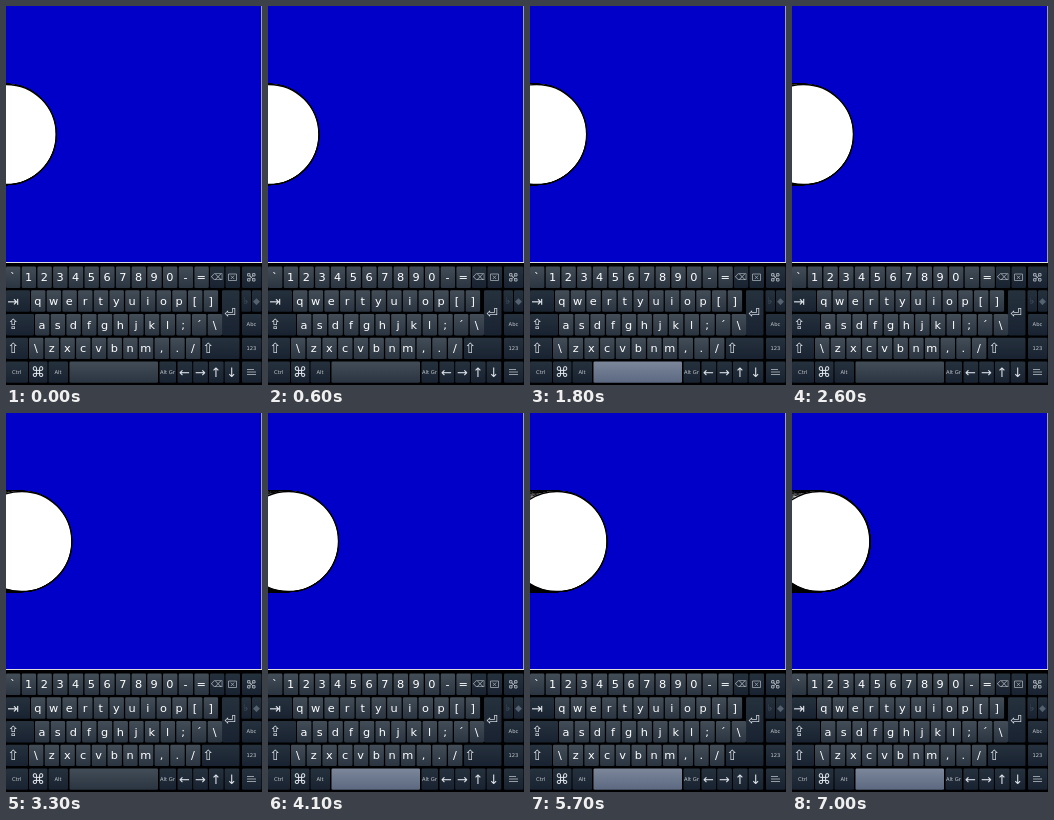
An HTML page with a canvas that plays this animation: 256 by 379 pixels, repeating every 8000 ms.

```html
<!DOCTYPE html>
<html lang="en">
<head>
<meta charset="utf-8">
<title>Sliding ball and keyboard</title>
<style>
  html, body { margin: 0; width: 256px; height: 379px; overflow: hidden; background: #000; }
  canvas, svg { position: absolute; left: 0; top: 0; display: block; }
  text { font-family: "DejaVu Sans", sans-serif; text-anchor: middle; }
</style>
</head>
<body>
<canvas width="256" height="257"></canvas>
<svg width="256" height="379" viewBox="0 0 256 379">
  <defs>
    <linearGradient id="plain" x2="0" y2="1"><stop stop-color="#434d58"/><stop offset="1" stop-color="#2b3541"/></linearGradient>
    <linearGradient id="dark" x2="0" y2="1"><stop stop-color="#26313e"/><stop offset="1" stop-color="#182230"/></linearGradient>
    <linearGradient id="lit" x2="0" y2="1"><stop stop-color="#7c879b"/><stop offset="1" stop-color="#5b6880"/></linearGradient>
  </defs>
  <g id="keys"></g>
</svg>
<script>
const LOOP = 8000, STEP = 100;
const PRESSES = [[1000, 2600], [4100, 4700], [5700, 8000]];
const PITCH = 15.7, ROW = 23.7, TOP = 260.6, KEY_H = 21.4;
const keys = document.getElementById('keys');
const ctx = document.querySelector('canvas').getContext('2d');

function add(tag, attrs, label) {
  const el = document.createElementNS('http://www.w3.org/2000/svg', tag);
  for (const name in attrs) el.setAttribute(name, attrs[name]);
  if (label) el.textContent = label;
  return keys.appendChild(el);
}

function key(row, x, right, label, { size = 11, fill = 'dark', color = '#dfe4ea', h = KEY_H, tx } = {}) {
  const y = TOP + row * ROW;
  const cap = add('rect', { x, y, width: right - x, height: h, rx: 1.3, fill: `url(#${fill})` });
  if (label) {
    add('text', {
      x: tx ?? (x + right) / 2 - 0.3, y: y + h / 2 + size * 0.34, 'font-size': size, fill: color
    }, label);
  }
  return cap;
}

function letters(row, x, chars) {
  [...chars].forEach((c, i) =>
    key(row, x + i * PITCH, x + i * PITCH + 14.4, c, { size: 11.3, fill: 'plain', color: '#fff' }));
}

function icon(d, width) {
  add('path', { d, fill: 'none', stroke: '#a4acb4', 'stroke-width': width });
}

const small = { size: 5.2, color: '#c3c9cf' };
const dim = { size: 9, color: '#566270' };

letters(0, 0, '`1234567890-=');
key(0, 204, 218.3, '⌫', { size: 8.5, color: '#aeb5bc' });
key(0, 219.5, 234, '');
icon('M222.5 268h8v6.5h-8zM224.8 269.6l3.4 3.4m0-3.4l-3.4 3.4', 0.8);
key(0, 236, 255.5, '');
icon('M243.5 269.5l3.6 3.6m0-3.6l-3.6 3.6M241.6 267.6h2.4v2.4h-2.4zm5 0h2.4v2.4h-2.4zm-5 5h2.4v2.4h-2.4zm5 0h2.4v2.4h-2.4z', 1);

key(1, 0, 24, '⇥', { size: 14, tx: 7 });
letters(1, 25, 'qwertyuiop[]');
key(1, 216, 233.5, '⏎', { size: 14, tx: 224, h: ROW + KEY_H });
key(1, 235.5, 245, '♭', dim);
key(1, 246, 255.5, '◆', dim);

key(2, 0, 28, '⇪', { size: 14, tx: 7 });
letters(2, 29, 'asdfghjkl;´\\');
key(2, 236, 255.5, 'Abc', small);

key(3, 0, 22, '⇧', { size: 14, tx: 7 });
letters(3, 23, '\\zxcvbnm,./');
key(3, 196, 233.5, '⇧', { size: 14, tx: 202 });
key(3, 236, 255.5, '123', small);

key(4, 0, 22, 'Ctrl', small);
key(4, 23, 41.5, '⌘', { size: 14 });
key(4, 42.5, 62, 'Alt', small);
const space = key(4, 63.5, 152, '', { fill: 'plain' });
key(4, 153.5, 170, 'Alt Gr', small);
[...'←→↑↓'].forEach((c, i) => key(4, 171.5 + i * PITCH, 186.2 + i * PITCH, c, { size: 13 }));
key(4, 236, 255.5, '');
icon('M241 363.5h7m-7 2.5h9m-9 2.5h9', 0.9);

function disc(x, y, paint) {
  ctx.beginPath();
  ctx.arc(x, y, 50, 0, 2 * Math.PI);
  ctx[paint]();
}

// The stage is never cleared between moves, so older outlines remain behind the ball.
function drawBall(last) {
  ctx.fillStyle = '#ddd';
  ctx.fillRect(0, 0, 256, 257);
  ctx.fillStyle = '#a0a0a0';
  ctx.fillRect(255, 0, 1, 256);
  ctx.fillStyle = '#0000c8';
  ctx.fillRect(0, 0, 255, 256);
  ctx.fillStyle = '#fff';
  ctx.strokeStyle = '#000';
  ctx.lineWidth = 1.3;
  for (let i = -54; i <= last * 6; i++) {
    const x = 13 + 15 * Math.cos((i / 6 - 66) * 2.4 * Math.PI / 180);
    disc(x - 0.5, 128, 'fill');
    disc(x, 128.5, 'stroke');
  }
}

let drawn = null;
function render(t) {
  const step = Math.min(70, Math.max(4, Math.floor(t / STEP)));
  if (step !== drawn) drawBall(drawn = step);
  const pressed = PRESSES.some(([from, to]) => t >= from && t < to);
  space.setAttribute('fill', pressed ? 'url(#lit)' : 'url(#plain)');
}

const start = performance.now();
function tick() {
  render((performance.now() - start) % LOOP);
  requestAnimationFrame(tick);
}
tick();
</script>
</body>
</html>
```
